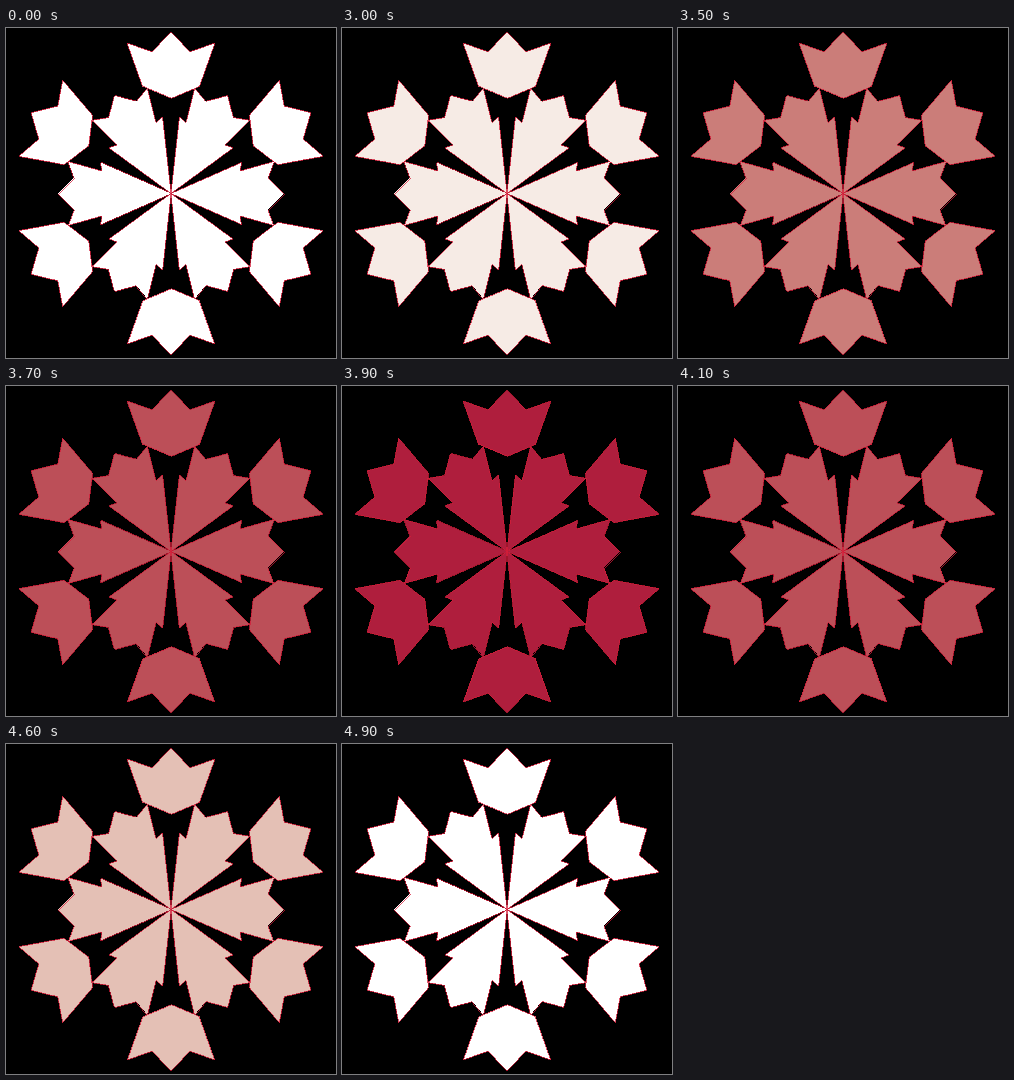
An HTML page that plays this animation: 330 by 330 pixels, repeating every 5000 ms.

```html
<!DOCTYPE html>
<html lang="en">
<head>
<meta charset="utf-8">
<title>Petal rosette</title>
<style>
  html, body { margin: 0; width: 100%; height: 100%; overflow: hidden; background: #000; }
  svg { display: block; width: 100vw; height: 100vh; }
</style>
</head>
<body>
<svg viewBox="0 0 330 330" shape-rendering="crispEdges">
  <g id="rosette" transform="translate(165 165.5)" fill="#fff" stroke="#d41c38" stroke-width="0.75"></g>
</svg>
<script>
const LOOP = 5000, HOLD = 3000, STEP = 100, PEAK = 10;

// Half outlines pointing right: [distance along the axis, distance from it]
const LEAF = [[0, 0], [70.5, 31], [69, 22.5], [103, 32], [97, 16], [113, 0]];
const CROWN = [[95, 0], [107, 28.5], [150.5, 44], [141.7, 19], [161.5, 0]];

const RED = [175, 30, 61];
const BEND = [0.2, -0.1, 0.38]; // how early each channel fades

const rosette = document.getElementById('rosette');

function addRing(half, offset) {
  const mirrored = half.slice(1, -1).reverse().map(([x, y]) => [x, -y]);
  const points = [...half, ...mirrored].join(' ');
  for (let i = 0; i < 6; i++) {
    const shape = document.createElementNS('http://www.w3.org/2000/svg', 'polygon');
    shape.setAttribute('points', points);
    shape.setAttribute('transform', `rotate(${offset + i * 60})`);
    rosette.append(shape);
  }
}

// White at p = 0, RED at p = 1
function fadeColor(p) {
  const channels = RED.map((c, i) => {
    const eased = p + BEND[i] * p * (1 - p);
    return Math.round(255 + (c - 255) * eased);
  });
  return `rgb(${channels})`;
}

function draw(now) {
  const t = now % LOOP;
  const step = t < HOLD ? 0 : Math.floor((t - HOLD) / STEP) + 1;
  rosette.setAttribute('fill', fadeColor(1 - Math.abs(1 - step / PEAK)));
}

addRing(LEAF, 0);
addRing(CROWN, 30);

const start = performance.now();
function tick() {
  draw(performance.now() - start);
  requestAnimationFrame(tick);
}
tick();
</script>
</body>
</html>
```
